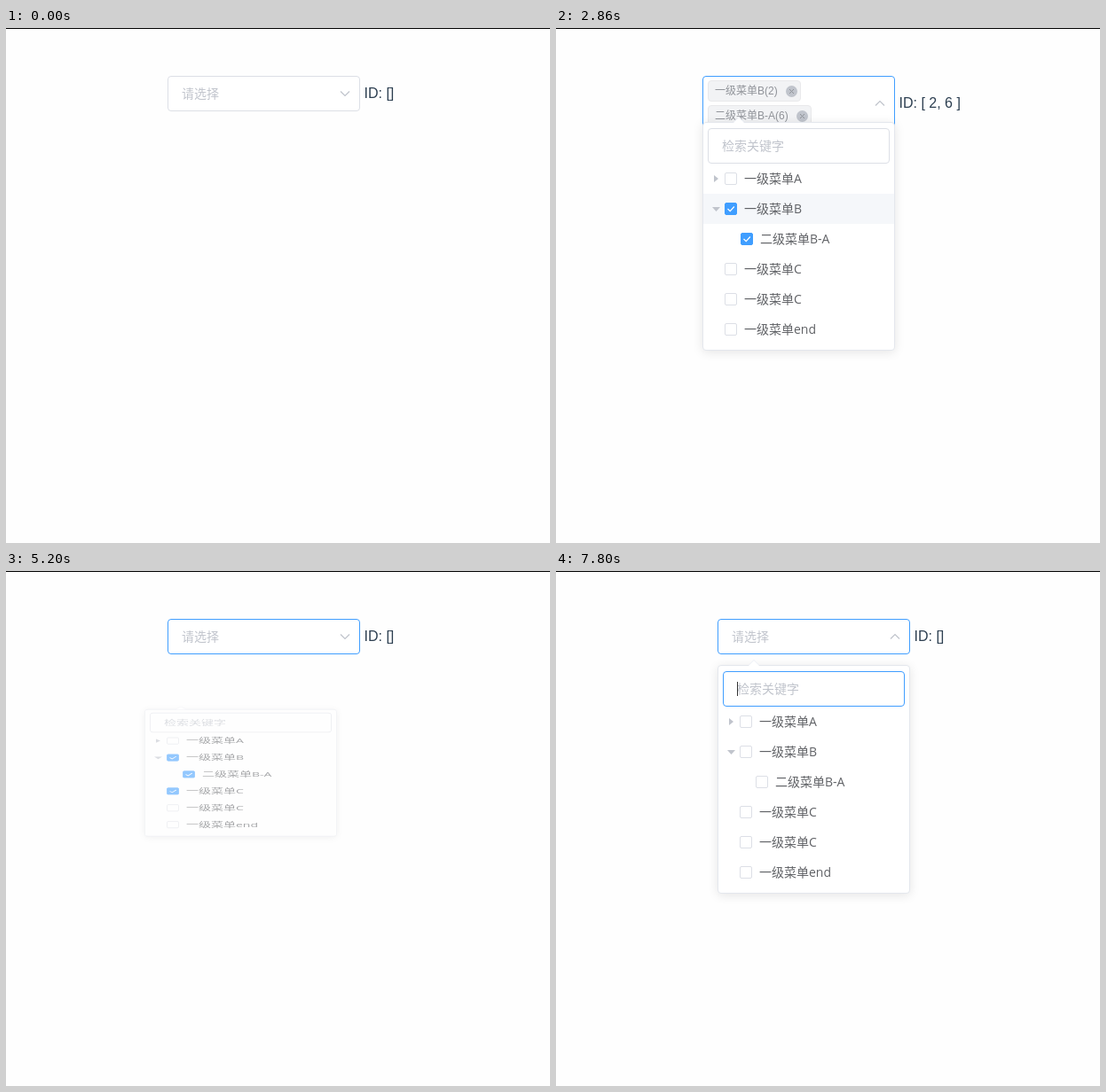
Write an HTML page that moves like this. It is 613 by 581 pixels and loops after 8000 ms.

```html
<!DOCTYPE html>
<html lang="zh-CN">
<head>
<meta charset="utf-8">
<style>
* { box-sizing: border-box; }
html, body { margin: 0; width: 100%; height: 100%; overflow: hidden; background: #fefefe; }
body {
  position: relative; border-top: 1px solid #000;
  font: 14px "Open Sans", "Noto Sans CJK SC", sans-serif; color: #606266;
}
#stage { position: absolute; left: 0; top: -1px; }
#stage div, #stage svg, #stage i { position: absolute; white-space: nowrap; }
.field { background: #fff; border: 1px solid #dcdfe6; border-radius: 4px; }
.hint { left: 15px; top: 0; line-height: 38px; color: #c0c4cc; }
#select { top: 54px; width: 217px; }
#arrow { left: 191.5px; width: 14px; height: 14px; }
.line { fill: none; stroke: #c0c4cc; stroke-width: 1.2; }
#label { font: 16px/20px "Liberation Sans", Arial, sans-serif; color: #2c3e50; }
.tag {
  left: 5px; height: 24px; padding: 0 3px 0 7px; border: 1px solid #e9e9eb; border-radius: 4px;
  background: #f2f3f5; color: #909399;
  font: 12px/22px "Liberation Sans", "Noto Sans CJK SC", sans-serif;
}
#stage .tag svg { position: static; width: 13px; height: 13px; margin-left: 9px; vertical-align: -3px; }
#panel {
  width: 217px; height: 258px; background: #fff; border: 1px solid #e4e7ed; border-radius: 4px;
  box-shadow: 0 2px 12px rgba(0,0,0,.1); transform-origin: center top;
}
#notch { left: 34px; top: -7px; }
#search { left: 5px; top: 6px; width: 205px; height: 40px; }
#caret { left: 15px; top: 11px; width: 1px; height: 16px; background: #333; }
.row { left: 0; width: 215px; height: 34px; line-height: 34px; }
.box { top: 10px; width: 14px; height: 14px; border: 1px solid #dcdfe6; border-radius: 2px; background: #fff; }
.box svg { left: -1px; top: -1px; }
</style>
</head>
<body>
<div id="stage">
  <div id="select" class="field">
    <div id="hint" class="hint">请选择</div>
    <svg id="arrow" viewBox="-7 -7 14 14"><path class="line" d="M-5 2.5L0-2.5 5 2.5"/></svg>
  </div>
  <div id="label"></div>
  <div id="panel">
    <svg id="notch" width="12" height="7"><path d="M0 6L6 0l6 6" fill="#ebeef5"/><path d="M0 7L6 1l6 6" fill="#fff"/></svg>
    <div id="search" class="field"><div class="hint">检索关键字</div><i id="caret"></i></div>
  </div>
</div>
<script>
const TICK = 130, LOOP = 8000, BLUE = "#409eff", GREY = "#dcdfe6", DARK = "#c0c4cc";
const $ = id => document.getElementById(id);
const add = (parent, cls, html) => {
  const el = document.createElement("div");
  el.className = cls;
  el.innerHTML = html;
  return parent.appendChild(el);
};

const ids = [2, 6, 3];
const tags = ["一级菜单B(2)", "二级菜单B-A(6)", "一级菜单C(3)"].map((text, i) => {
  const el = add($("select"), "tag", text + `<svg viewBox="0 0 13 13"><circle cx="6.5" cy="6.5" r="6.5" fill="#c0c4cc"/>
    <path d="M4 4l5 5M9 4l-5 5" stroke="#909399"/></svg>`);
  el.style.top = 4 + 28 * i + "px";
  return el;
});

const carets = ["M12 13l5 4-5 4z", "M10 15h9l-4.500 5z"];
const rows = ["一级菜单A", "一级菜单B", "二级菜单B-A", "一级菜单C", "一级菜单C", "一级菜单end"].map((text, i) => {
  const left = i == 2 ? 42 : 24;
  const caret = carets[i] ? `<svg width="22" height="34"><path d="${carets[i]}" fill="#c0c4cc"/></svg>` : "";
  const el = add($("panel"), "row", `${caret}<div class="box" style="left:${left}px"><svg width="14" height="14">
    <path d="M3.500 7l2.700 2.700 4.600-5.200" fill="none" stroke="#fff" stroke-width="1.200"/></svg></div>
    <div style="left:${left + 22}px">${text}</div>`);
  el.style.top = 46 + 34 * i + "px";
  return { el, box: el.querySelector(".box") };
});

// Each entry changes part of the state; tags and checks are counts, row and box are row numbers.
const events = [
  [0, { x: 182, px: 182, py: 106, tags: 0, checks: 0, row: -1, box: -1, border: GREY, search: GREY, caret: 0 }],
  [780, { border: DARK }],
  [1040, { border: BLUE }],
  [1690, { search: DARK }],
  [1820, { search: GREY, row: 0 }],
  [1950, { row: 1 }],
  [2210, { box: 1 }],
  [2600, { x: 165, tags: 2, checks: 2 }],
  [2860, { px: 165 }],
  [3120, { py: 128, box: -1 }],
  [3250, { row: 2 }],
  [3380, { row: 3, box: 3 }],
  [3510, { x: 156, px: 156, py: 156, tags: 3, row: 2 }],
  [3640, { checks: 3 }],
  [4030, { row: 1, box: -1 }],
  [4160, { row: 0 }],
  [4290, { row: -1, search: DARK }],
  [4420, { search: GREY }],
  [5200, { x: 182, tags: 0 }],
  [5850, { px: 182, py: 106, checks: 0 }],
  [6630, { search: DARK }],
  [6760, { search: BLUE, caret: 1 }],
  [7280, { caret: 0 }],
  [7800, { caret: 1 }]
];

function bezier(x1, y1, x2, y2) {
  const at = (a, b, s) => 3 * a * s * (1 - s) ** 2 + 3 * b * s * s * (1 - s) + s ** 3;
  return x => {
    if (x <= 0 || x >= 1) return x <= 0 ? 0 : 1;
    let lo = 0, hi = 1;
    for (let i = 0; i < 24; i++) {
      const mid = (lo + hi) / 2;
      at(x1, x2, mid) < x ? lo = mid : hi = mid;
    }
    return at(y1, y2, lo);
  };
}
const zoom = bezier(.23, 1, .32, 1), ease = bezier(.25, .1, .25, 1);
const toggle = (t, fn, open, close, reopen, closeTime) =>
  fn((t - open) / 300) - fn((t - close) / closeTime) + fn((t - reopen) / 300);

function draw(t) {
  const s = Object.assign({}, ...events.filter(e => e[0] <= t).map(e => e[1]));
  const height = s.tags ? s.tags * 28 + 6 : 40;

  Object.assign($("select").style, { left: s.x + "px", height: height + "px", borderColor: s.border });
  $("hint").hidden = s.tags > 0;
  tags.forEach((el, i) => el.hidden = i >= s.tags);
  const turn = toggle(t, ease, 1035, 5190, 6056, 1);
  $("arrow").style.top = height / 2 - 8 + "px";
  $("arrow").style.transform = `rotate(${180 - 180 * turn}deg)`;

  $("label").textContent = "ID: " + (s.tags ? `[ ${ids.slice(0, s.tags).join(", ")} ]` : "[]");
  Object.assign($("label").style, { left: s.x + 221.5 + "px", top: 44 + height / 2 + "px" });

  const shown = toggle(t, zoom, 1034, 5166, 6075, 300);
  Object.assign($("panel").style, {
    left: s.px + "px", top: s.py + "px", opacity: shown, transform: `scaleY(${shown})`
  });
  $("search").style.borderColor = s.search;
  $("caret").hidden = !s.caret;
  rows.forEach(({ el, box }, i) => {
    const on = i > 0 && i <= s.checks;
    el.style.background = i == s.row ? "#f5f7fa" : "none";
    box.style.background = on ? BLUE : "#fff";
    box.style.borderColor = on || i == s.box ? BLUE : GREY;
    box.firstChild.style.display = on ? "" : "none";
  });
}

const start = performance.now();
function frame() {
  const t = (performance.now() - start) % LOOP;
  draw(Math.floor(t / TICK) * TICK);
  requestAnimationFrame(frame);
}
frame();
</script>
</body>
</html>
```
